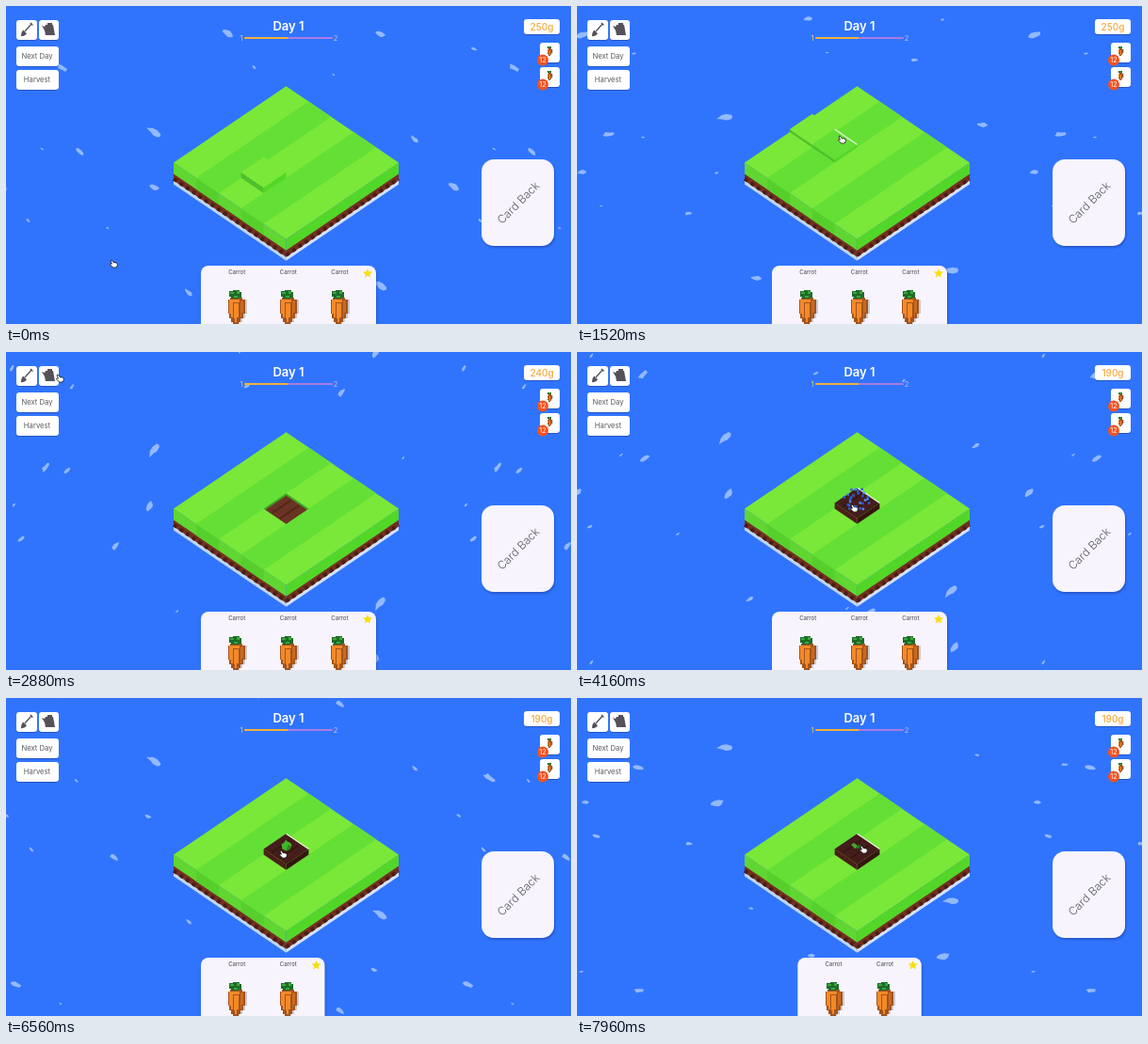
An HTML page for the animation above (8 s loop, 600 px wide and 338 px high).

```html
<!DOCTYPE html>
<html lang="en">
<head>
<meta charset="utf-8">
<title>Island farm</title>
<style>
  html, body { margin: 0; width: 100%; height: 100%; overflow: hidden; background: #3074fe; }
  svg { display: block; width: 100%; height: 100%; font-family: Inter, "Open Sans", sans-serif; }
  text { text-anchor: middle; fill: #5a5a62; }
  .box { fill: #fff; filter: drop-shadow(.5px 1px .7px #1c3f9a99); }
  .panel { fill: #f7f4fd; filter: drop-shadow(1.5px 2px .8px #1c3f9a88); }
</style>
</head>
<body>
<svg viewBox="0 0 600 338">
  <defs>
    <g id="foam"></g>
    <g id="carrot" shape-rendering="crispEdges">
      <path d="M-4 11h15v15h-2v5h-3v4h-3v3h-7z" fill="#cbc9d2"/>
      <path d="M-9 11h2v-2h13v2h3v15h-2v5h-3v4h-2v4h-6v-4h-2v-4h-2v-5h-1z" fill="#a3531d"/>
      <path d="M-8 11h11v3h-7v16h-2v-4h-2zM-3 15h5v15h-2v5h-2v-4h-1z" fill="#f38a28"/>
      <path d="M4 12h3v13h-2v5h-1z" fill="#c86a20"/>
      <path d="M-8 2h4v-1h7v2h2v6h-3v1h-8v-2h-2z" fill="#1f6a2a"/>
      <path d="M-7 3h4v2h-4zM0 2h3v3h-3zM-3 7h4v2h-4z" fill="#3aa83a"/>
    </g>
    <path id="star" d="M0-5 1.500-1.800 5-1.500 2.400.9 3.100 4.400 0 2.600-3.100 4.400-2.400.9-5-1.500-1.500-1.800z" fill="#f8de10"/>
  </defs>
  <rect width="600" height="338" fill="#3074fe"/>
  <g id="sea" opacity=".75"></g>
  <g id="island"></g>
  <g id="tiles"></g>

  <g id="ui">
    <rect class="box" x="11" y="15" width="22" height="21" rx="3"/>
    <rect class="box" x="35" y="15" width="21" height="21" rx="3"/>
    <path d="M27.500 18.500 20 27M25.800 18l2.700 2.400" stroke="#55505a" stroke-width="1.300"/>
    <path d="M18 25.500l4 3.700q-2 3-6 3 0-4 2-6.700z" fill="#55505a"/>
    <path d="M38 21l3 1 1-2h8l2 11h-10l-1-5zM44 20v-2h5v2" fill="#55505a"/>
    <rect class="box" x="11" y="43" width="45" height="21" rx="3"/>
    <rect class="box" x="11" y="68" width="45" height="21" rx="3"/>
    <text x="33" y="55.800" font-size="7.700">Next Day</text>
    <text x="33" y="81" font-size="7.700">Harvest</text>

    <text x="300" y="26" font-size="13" font-weight="600" style="fill:#fff">Day 1</text>
    <path d="M254 34h46" stroke="#f2b13c" stroke-width="2.200" stroke-linecap="round"/>
    <path d="M300 34h46" stroke="#a97be0" stroke-width="2.200" stroke-linecap="round"/>
    <text x="250" y="37" font-size="7.500" style="fill:#f4cb7a">1</text>
    <text x="350" y="37" font-size="7.500" style="fill:#d5c2f4">2</text>

    <rect class="box" x="550" y="14" width="38" height="16" rx="3"/>
    <text id="money" x="569" y="25.700" font-size="10" font-weight="500" style="fill:#f5a83c"></text>
    <g id="item">
      <rect class="box" x="567" y="39" width="21" height="21" rx="3"/>
      <use href="#carrot" transform="translate(577.500 42.500) scale(.28)"/>
      <circle cx="570" cy="57.500" r="6" fill="#f4511e"/>
      <text x="570" y="60.200" font-size="7.300" style="fill:#fff">12</text>
    </g>
    <use href="#item" y="26"/>
    <rect class="panel" x="505" y="163" width="77" height="92" rx="13"/>
    <text font-size="12" font-weight="300" transform="translate(547 212) rotate(-45)">Card Back</text>
  </g>

  <g id="hand">
    <rect id="tray" class="panel" x="207" y="276" height="80" rx="8"/>
    <g id="cards"></g>
    <use id="badge" href="#star" y="284"/>
  </g>
  <path id="cursor" d="M-3-3.500q1-1 2 .2l1.200 2 2.800.2q1.600.4 1.400 2.200l-.9 2.600-3.500.5-3.300-3q-.6-1.200.7-1.200l1 .2z" fill="#fff" stroke="#111" stroke-width=".8" stroke-linejoin="round"/>
</svg>
<script>
const LOOP = 8000, SIZE = 5, TILE_W = 23.9, TILE_H = 16.25, LIFT = 6;
const DIG = 2000, WATER = 3960, GRAB = 4720, PLANT = 6900;
const GRASS_DEPTH = 12, SOIL_DEPTH = 19, FOAM_DEPTH = 23;
const $ = id => document.getElementById(id);
const clamp = v => Math.max(0, Math.min(1, v));
const ease = p => p * p * (3 - 2 * p);
const rand = n => { const s = Math.sin(n * 127.1 + 11.7) * 43758.5453; return s - Math.floor(s); };

const hole = [294, 166], shovel = [24, 27], can = [57, 28], card = [354, 311];
const stops = [
  [-130, [272, 184]], [0, [114, 274]], [680, shovel], [900, shovel], [1520, [281, 142]],
  [DIG - 160, hole], [DIG + 120, hole], [2780, can], [3000, can], [3700, hole], [4180, hole],
  [GRAB - 150, card], [GRAB, card], [5160, [325, 224]], [5950, hole], [6900, hole], [LOOP, [304, 161]]
];

function cursorAt(t) {
  const k = stops.findIndex(([time]) => time > t);
  if (k < 1) return stops[0][1];
  const [t0, a] = stops[k - 1], [t1, b] = stops[k], p = ease((t - t0) / (t1 - t0));
  return a.map((v, axis) => v + (b[axis] - v) * p);
}

const poly = (points, fill) => `<polygon points="${points.map(p => p.join()).join(' ')}" fill="${fill}"/>`;
const line = (points, attrs) => `<polyline points="${points.map(p => p.join()).join(' ')}" fill="none" ${attrs}/>`;
const corner = (u, v, dy = 0) => [297.5 + TILE_W * (u - v), 85.3 + TILE_H * (u + v) + dy];
const strip = (a, b, y0, y1, fill) =>
  poly([[a[0], a[1] + y0], [b[0], b[1] + y0], [b[0], b[1] + y1], [a[0], a[1] + y1]], fill);
const grass = i => i % 2 ? '#64df35' : '#7ae838';
const leftGrass = i => i % 2 ? '#56cf2d' : '#60d632';
const rightGrass = '#52d728';
const soilColor = t => t < WATER ? '#6a3424' : '#451d1a';

function bricks(a, b) {
  const below = dy => [a, b].map(([x, y]) => [x, y + dy]);
  return strip(a, b, GRASS_DEPTH - .5, SOIL_DEPTH, '#74301f') +
    line(below(GRASS_DEPTH + 5), 'stroke="#4a1d15" stroke-width="4" stroke-dasharray="4 4"');
}

function drawIsland() {
  const back = corner(0, 0), left = corner(0, SIZE), front = corner(SIZE, SIZE), right = corner(SIZE, 0);
  let out = strip(left, front, SOIL_DEPTH - .5, FOAM_DEPTH, '#bfd6fa') +
    strip(front, right, SOIL_DEPTH - .5, FOAM_DEPTH, '#d3e2fb') +
    bricks(left, front) + bricks(front, right) +
    strip(left, front, 0, GRASS_DEPTH, leftGrass(0)) + strip(front, right, 0, GRASS_DEPTH, rightGrass) +
    poly([back, right, front, left], grass(0));
  for (let i = 1; i < SIZE; i += 2) {
    out += strip(corner(i, SIZE), corner(i + 1, SIZE), 0, GRASS_DEPTH, leftGrass(i)) +
      poly([corner(i, 0), corner(i + 1, 0), corner(i + 1, SIZE), corner(i, SIZE)], grass(i));
  }
  return out;
}

function tileAt([x, y]) {
  const d = (x - 297.5) / TILE_W, s = (y - 85.3) / TILE_H;
  const i = Math.floor((s + d) / 2), j = Math.floor((s - d) / 2);
  return Math.min(i, j) >= 0 && Math.max(i, j) < SIZE ? i * SIZE + j : -1;
}
const HOLE = tileAt(hole);

function furrows(i, j, dy) {
  return [.3, .65].map(f =>
    line([corner(i + f, j + .08, dy), corner(i + f, j + .92, dy)], 'stroke="#220a08" stroke-opacity=".3" stroke-width="2"')).join('');
}

function sunkenSoil(t) {
  const d = 2.5, [x, y] = corner(2.5, 2.5), w = TILE_W * (1 - d / (2 * TILE_H));
  return poly([corner(2, 2), corner(3, 2), corner(3, 3), corner(2, 3)], '#3f9f24') +
    poly([[x, y - TILE_H + d], [x + w, y + d / 2], [x, y + TILE_H], [x - w, y + d / 2]], soilColor(t)) +
    furrows(2, 2, 1);
}

function raisedTile(tile, lift, hovered, t) {
  const i = Math.floor(tile / SIZE), j = tile % SIZE, soil = tile === HOLE && t >= DIG;
  const back = corner(i, j, -lift), right = corner(i + 1, j, -lift);
  const front = corner(i + 1, j + 1, -lift), left = corner(i, j + 1, -lift);
  const onLeft = j === SIZE - 1, onRight = i === SIZE - 1;
  let out = (onLeft ? bricks(left, front) : '') + (onRight ? bricks(front, right) : '') +
    strip(left, front, 0, onLeft ? GRASS_DEPTH : lift, soil ? '#4a2019' : '#50bf2b') +
    strip(front, right, 0, onRight ? GRASS_DEPTH : lift, soil ? '#35150f' : rightGrass) +
    poly([back, right, front, left], soil ? soilColor(t) : grass(i));
  if (soil) out += furrows(i, j, -lift);
  if (hovered) {
    const rim = onRight ? [left, back, right, [right[0], right[1] + 26]] : [back, right];
    out += line(rim, 'stroke="#e9f7e4" stroke-width="1.200"');
  }
  return out;
}

function ghost(x, y, ok) {
  const [body, shade] = ok ? ['#43b52c', '#2d8a22'] : ['#ee3a1c', '#c42a12'];
  return `<g transform="translate(${x} ${y})"><path d="M-5-1l3-2 2-3 1 2 3 1 2 3-2 4-4 2-4-2z" fill="${body}"/>` +
    `<path d="M2-1l3 2-2 4-3 1z" fill="${shade}"/></g>`;
}

const sprout = (x, y) =>
  `<path d="M${x - 5} ${y - 2}l3-2 3 2 1 3-3 1z" fill="#49a532"/><path d="M${x} ${y + 2}l2-4 4 1-2 3z" fill="#286f25"/>`;

function drops(t) {
  const age = (t - WATER) / 700;
  if (age < 0 || age > 1) return '';
  let out = '';
  for (let n = 0; n < 26; n++) {
    const a = n * 2.4, r = (5 + rand(n) * 9) * (.7 + age);
    const y = 154 + Math.sin(a) * r * .9 + age * age * 14;
    out += `<rect x="${296 + Math.cos(a) * r}" y="${y}" width="2.500" height="2.500" fill="${n % 3 ? '#2c62d8' : '#4f8cff'}" opacity="${1 - age ** 3}"/>`;
  }
  return out;
}

// A tile rises by the share of recent moments the cursor spent over it.
function drawTiles(t, pos) {
  const counts = {};
  for (let s = 0; s < 10; s++) {
    const tile = tileAt(cursorAt(t - s * 30));
    if (tile >= 0) counts[tile] = (counts[tile] || 0) + 1;
  }
  const hovered = tileAt(pos), depth = n => Math.floor(n / SIZE) + n % SIZE;
  let out = t >= DIG && !counts[HOLE] ? sunkenSoil(t) : '';
  Object.keys(counts).map(Number).sort((a, b) => depth(a) - depth(b)).forEach(tile => {
    out += raisedTile(tile, LIFT * clamp(counts[tile] / 6), tile === hovered, t);
  });
  if (t >= PLANT) out += sprout(296, 158);
  else if (t > GRAB && hovered >= 0) {
    const ok = hovered === HOLE, [x, y] = corner(Math.floor(hovered / SIZE) + .5, hovered % SIZE + .5, -LIFT);
    out += ghost(x, y - (ok ? 4 : 0), ok);
  }
  return out + drops(t);
}

// One cell of foam, repeated over the sea on the island's own diamond lattice.
const CELL_W = 240, CELL_H = 163;
const patches = [[157, 134], [72, 155], [40, 152], [2, 192], [20, 228], [12, 46], [65, 66], [112, 236], [188, 305], [155, 193]];

function blob(seed, size) {
  const points = [];
  for (let n = 0; n < 9; n++) {
    const a = n * Math.PI * 2 / 9, r = size * (.6 + .6 * rand(seed * 9 + n));
    points.push([Math.cos(a) * r, Math.sin(a) * r * .42]);
  }
  return poly(points, '#b5d0ff');
}

function drawFoam(t) {
  const turn = 45 * Math.cos(t * Math.PI * 2 / 6600) - 12;
  return patches.map(([x, y], n) => {
    const pulse = n ? .65 + .35 * Math.sin(t / 700 + n * 2.4) : 1;
    const sway = n ? 7 * Math.sin(t / 900 + n * 1.7) : 0;
    return `<g transform="translate(${x + sway} ${y - t * .0102}) rotate(${turn + (rand(n) - .5) * 24}) scale(${pulse})">` +
      blob(n, n ? 4 + rand(n + 5) * 4 : 8) + '</g>';
  }).join('');
}

function foamLattice() {
  let out = '';
  for (let row = -2; row <= 3; row++)
    for (let col = -1; col <= 2; col++)
      if ((row + col) % 2 === 0) out += `<use href="#foam" x="${col * CELL_W}" y="${row * CELL_H}"/>`;
  return out;
}

function drawHand(t) {
  const count = t < GRAB ? 3 : 2, width = 22.5 + count * 54.5;
  const slide = 27.3 * ease(clamp((t - PLANT) / 320));
  $('hand').setAttribute('transform', `translate(${slide} 0)`);
  $('tray').setAttribute('width', width);
  $('badge').setAttribute('x', 207 + width - 9);
  $('cards').lastChild.style.display = count === 3 ? '' : 'none';
}

$('sea').innerHTML = foamLattice();
$('island').innerHTML = drawIsland();
$('cards').innerHTML = [0, 1, 2].map(n => 245.2 + n * 54.6).map(x =>
  `<text x="${x}" y="285" font-size="6" font-weight="500">Carrot</text><use href="#carrot" x="${x}" y="301"/>`)
  .map(content => `<g>${content}</g>`).join('');

const start = performance.now();
function frame(now) {
  const t = Math.max(0, now - start) % LOOP, pos = cursorAt(t);
  $('foam').innerHTML = drawFoam(t);
  $('tiles').innerHTML = drawTiles(t, pos);
  $('money').textContent = (t < DIG ? 250 : t < WATER ? 240 : 190) + 'g';
  drawHand(t);
  $('cursor').setAttribute('transform', `translate(${pos.join(' ')})`);
  requestAnimationFrame(frame);
}
frame(start);
</script>
</body>
</html>
```
